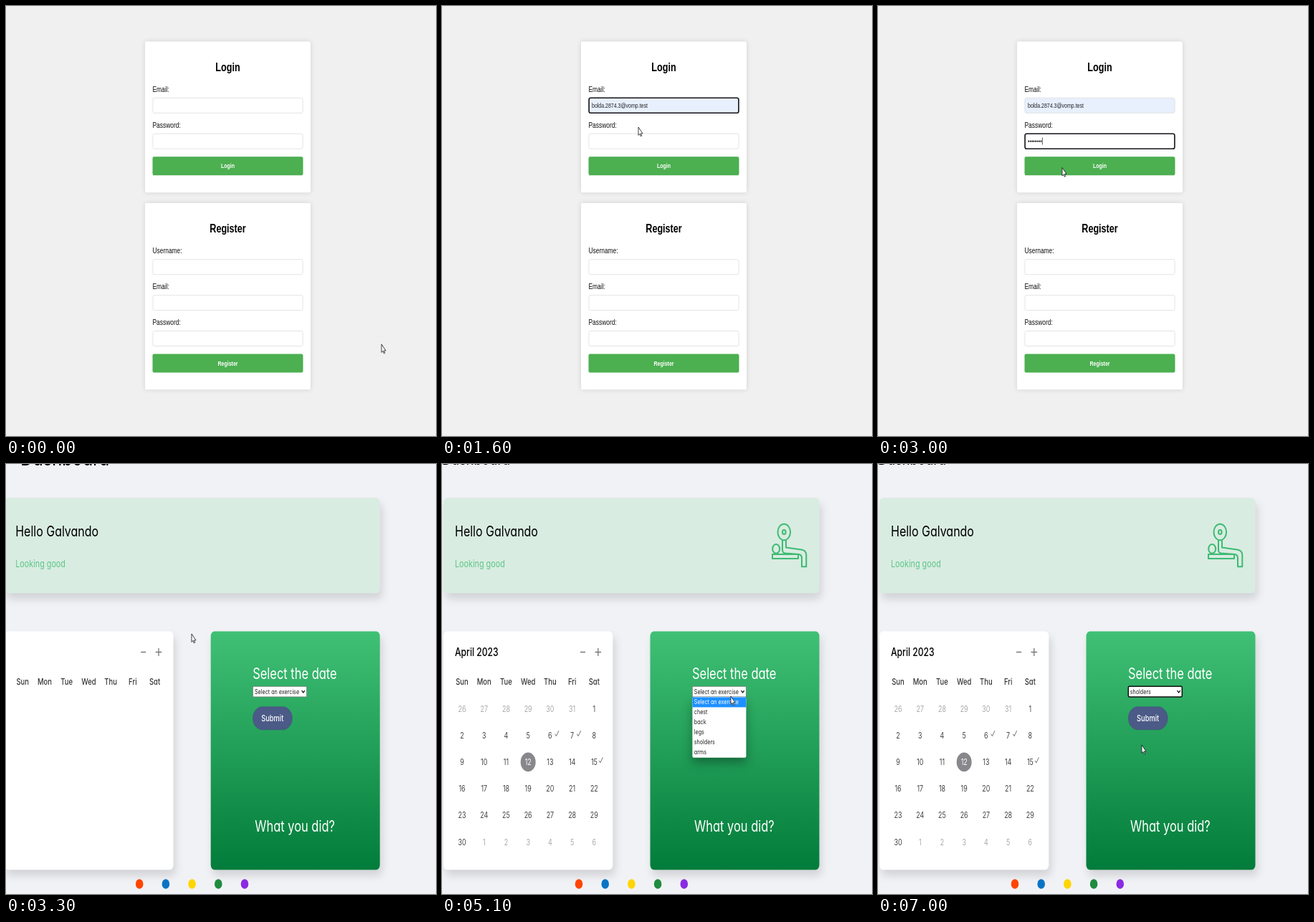
These frames come from a looping animation (600 by 600 pixels, 7.2 s). An HTML page:

```html
<!DOCTYPE html>
<html lang="en">
<head>
<meta charset="utf-8">
<title>Login and dashboard</title>
<style>
  html, body { margin: 0; width: 100%; height: 100%; overflow: hidden; background: #f0f0f0; }
  svg { display: block; width: 600px; height: 600px; }
  text { white-space: pre; }
  .form { font-family: "Liberation Sans", Arial, sans-serif; }
  .list { font-family: "Open Sans", "Noto Sans", sans-serif; }
  .dash { font-family: Inter, "Open Sans", sans-serif; font-feature-settings: "cv11"; }
  .card { filter: drop-shadow(0 0 3px rgba(0, 0, 0, .13)); }
  .tile { filter: drop-shadow(3px 8px 6px rgba(0, 0, 0, .13)); }
  .popup { filter: drop-shadow(0 2px 2px rgba(0, 0, 0, .25)); }
  .menu { filter: drop-shadow(0 7px 7px rgba(0, 0, 0, .32)); }
</style>
</head>
<body>
<svg id="stage" viewBox="0 0 600 600">
  <defs>
    <linearGradient id="green" x2="0" y2="1">
      <stop stop-color="#40c075"/>
      <stop offset="1" stop-color="#027c3a"/>
    </linearGradient>
  </defs>
</svg>
<script>
const LOOP = 7200, STEP = 100;
const SQUEEZE = 0.7875; // the whole screen is shown narrower than recorded
const stage = document.getElementById('stage');

function add(parent, tag, attrs = {}) {
  const node = document.createElementNS('http://www.w3.org/2000/svg', tag);
  for (const k in attrs) node.setAttribute(k, attrs[k]);
  return parent.appendChild(node);
}
const group = (parent, cls = '') => add(parent, 'g', { class: cls });
const box = (parent, x, y, width, height, fill, more) =>
  add(parent, 'rect', { x, y, width, height, fill, ...more });
const line = (parent, d, stroke, width, more) =>
  add(parent, 'path', { d, stroke, fill: 'none', 'stroke-width': width, ...more });
const oval = (parent, cx, cy, rx, ry, fill, more) =>
  add(parent, 'ellipse', { cx, cy, rx, ry, fill, ...more });
function label(parent, x, y, str, size, more) {
  const node = add(parent, 'text', {
    transform: `translate(${x} ${y}) scale(${SQUEEZE} 1)`, 'font-size': size, ...more
  });
  node.textContent = str;
  return node;
}
const show = (node, on) => node.setAttribute('visibility', on ? 'inherit' : 'hidden');
const MID = { 'text-anchor': 'middle' };

// Login page
const forms = group(stage, 'form');
box(forms, 0, 0, 600, 600, '#f0f0f0');

function field(name, y) {
  label(forms, 204.5, y - 8, name, 10.67, { fill: '#111' });
  return box(forms, 204.9, y + .4, 209.2, 21, '#fff', { rx: 2.1, ry: 2.7, stroke: '#ddd', 'stroke-width': .8 });
}
function form(title, y, height, names) {
  box(forms, 194, y, 231, height, '#fff', { rx: 2.1, ry: 2.7, class: 'card' });
  label(forms, 309.5, y + 41.3, title, 16, { ...MID, 'font-weight': 700 });
  const fields = names.map((name, i) => field(name, y + 78.3 + i * 49.9));
  const top = y + 60.8 + names.length * 49.9;
  box(forms, 204.5, top, 210, 26, '#4caf50', { rx: 2.1, ry: 2.7 });
  label(forms, 309.5, top + 16.2, title, 8.9, { ...MID, fill: '#fff', 'font-weight': 700 });
  return fields;
}
const [emailBox] = form('Login', 49.6, 210.6, ['Email:', 'Password:']);
form('Register', 275, 260.3, ['Username:', 'Email:', 'Password:']);

const emailText = label(forms, 209, 142, '', 8.9, { fill: '#222' });
const passText = label(forms, 209, 192, '', 8.9, { fill: '#222' });
const ring = box(forms, 205.1, 0, 208.8, 21, 'none', { rx: 2.2, ry: 2.8, stroke: '#15151c', 'stroke-width': 1.6 });
const caret = box(forms, 0, 0, .7, 10, '#111');

const MAILS = [
  'bolda.2874.3@vomp.test', 'magic_tuvo@quimzo.test', 'lavoki.5518@vomp.test',
  'bolda_2874_3@quimzo.test', 'Bolda.2874.3@vomp.test', 'noxcalidiro47@vomp.test'
];
const popup = group(forms, 'list');
box(popup, 256.5, 156, 107, 149, '#fff', { rx: 1.5, class: 'popup' });
const mailMark = box(popup, 256.5, 159, 107, 24, '#ececec');
MAILS.forEach((mail, i) => label(popup, 263, 173.6 + i * 24, mail, 8, { fill: '#333' }));

// Dashboard
const dash = group(stage, 'dash');
box(dash, 0, 0, 600, 600, '#f1f2f6');
const page = group(dash);
const heading = label(page, 0, 0, 'Dashboard', 23);

const tile = (x, y, w, h, fill) => box(page, x, y, w, h, fill, { rx: 5.2, ry: 6.7, class: 'tile' });
tile(2, 47.3, 524.5, 133, '#d9ece1');
tile(2, 233.6, 236.3, 332.6, '#fff');
tile(290.5, 233.6, 236, 332.6, 'url(#green)');

label(page, 18, 101, 'Hello Galvando', 20.3);
label(page, 18, 144, 'Looking good', 13.7, { fill: '#5bc688' });
line(page, 'M193 262.5h7M213.5 262.5h8.6M217.8 257v11', '#777', 1.3);

const colX = c => 28 + c * 30.72;
['Sun', 'Mon', 'Tue', 'Wed', 'Thu', 'Fri', 'Sat'].forEach((day, c) =>
  label(page, colX(c), 308.4, day, 12, { ...MID, fill: '#333', 'font-weight': 500 }));

const loaded = group(page);
label(loaded, 18, 268.3, 'April 2023', 15.4, { 'font-weight': 500 });
for (let i = 0; i < 42; i++) {
  const x = colX(i % 7), y = 341.5 + Math.floor(i / 7) * 37.2;
  const inMonth = i >= 6 && i < 36;
  const day = i < 6 ? 26 + i : i < 36 ? i - 5 : i - 35;
  const today = inMonth && day === 12;
  if (today) oval(loaded, x, y, 10.5, 13.3, '#88888c');
  label(loaded, x, y + 4.1, day, 11.3, { ...MID, fill: today ? '#fff' : inMonth ? '#444' : '#aaa' });
  if (inMonth && [6, 7, 15].includes(day))
    line(loaded, `M${x + 6.8} ${y - 2}l1.7 3 3.6-7.6`, '#666', .9);
}

// Bench press icon
const icon = add(loaded, 'g', {
  fill: 'none', stroke: '#3dbb73', 'stroke-width': 2, 'stroke-linejoin': 'round'
});
oval(icon, 477.3, 95, 8.8, 11.3, 'none');
oval(icon, 477.3, 95, 2.3, 3, 'none');
oval(icon, 466.2, 118.4, 5, 6.4, 'none');
add(icon, 'path', { d: 'M461 126h36v6h-36z' });
add(icon, 'path', { d: 'M475 106.5V120q0 4 4 4.5l19 1.5q4 1 4 5v12.3h6.3V127q0-6.5-7-7.5l-21.3-3v-10' });

label(page, 349, 300, 'Select the date', 20.9, { fill: '#fff' });
label(page, 352, 513, 'What you did?', 20.9, { fill: '#fff' });
box(page, 349.3, 338.8, 54.8, 32, '#4b5a86', {
  rx: 13, ry: 16, stroke: '#3f4c78', 'stroke-width': .8, 'stroke-dasharray': '1.5 1'
});
label(page, 376.6, 359, 'Submit', 11.8, { ...MID, fill: '#fff', 'font-weight': 500 });

const select = box(page, 349.3, 310.3, 75, 14.6, '#fff', { stroke: '#767676', 'stroke-width': .7 });
const choice = label(page, 351.8, 321, '', 9.1, { fill: '#222' });
line(page, 'M417.5 316.2l2.1 2.7 2.1-2.7', '#111', 1.3);

const OPTIONS = ['Select an exercise', 'chest', 'back', 'legs', 'sholders', 'arms'];
const menu = group(page);
box(menu, 349.4, 325, 75, 84.7, '#fff', { rx: 2, class: 'menu' });
const optionMark = box(menu, 349.4, 0, 75, 14, '#1e90ff');
const options = OPTIONS.map((name, i) => label(menu, 351.8, 335.4 + i * 14, name, 9.1));

['#ff4500', '#0a74c4', '#ffd500', '#1f8b3f', '#8a2be2'].forEach((color, i) =>
  oval(page, 191 + i * 36.7, 586, 5.3, 6.8, color));

// Pointer
const pointer = group(stage);
const arrow = add(pointer, 'path', {
  d: 'M0 0V11.4L1.9 9.4 3.3 12.8 4.7 12.2 3.4 8.9H6Z', fill: '#fff', stroke: '#111', 'stroke-width': .8
});
const beam = line(pointer, 'M-2-5h4M0-5v10M-2 5h4', '#222', .9);

const PATH = [ // ms, x, y
  [0, 524, 472], [700, 257, 147], [1100, 257, 147], [1400, 274, 169], [1600, 274, 169],
  [1900, 255, 190], [2100, 255, 206], [2500, 255, 206], [2900, 257, 225], [3100, 257, 226],
  [3300, 259, 237], [3600, 259, 240], [4100, 203, 331], [4400, 212, 350], [4900, 403, 318],
  [5100, 403, 324], [5400, 401, 340], [5800, 390, 386], [6200, 388, 388], [6700, 368, 392], [7200, 368, 392]
];
function pointerAt(t) {
  const i = PATH.findIndex(p => p[0] > t);
  const [t0, x0, y0] = PATH[i - 1], [t1, x1, y1] = PATH[i];
  const u = (t - t0) / (t1 - t0), e = u * u * (3 - 2 * u);
  return [x0 + (x1 - x0) * e, y0 + (y1 - y0) * e];
}

function drawForms(t) {
  const filled = t >= 1500, onPass = t >= 1900;
  const typed = filled ? MAILS[0] : t >= 1000 ? 'b' : '';
  const dots = Math.max(0, Math.min(8, (t - 2100) / STEP));
  emailText.textContent = typed;
  passText.textContent = '•'.repeat(dots);
  emailBox.setAttribute('fill', filled ? '#e8f0fe' : '#fff');
  show(ring, t >= 800 && t < 3100);
  ring.setAttribute('y', onPass ? 178.2 : 128.3);
  show(caret, t >= 800 && t < 3100 && (onPass || !filled));
  caret.setAttribute('x', 209.3 + (onPass ? dots * 2.45 : typed.length * 3.9));
  caret.setAttribute('y', onPass ? 183.5 : 133.7);
  show(popup, t >= 900 && t < 1500);
  show(mailMark, t >= 1300 && t < 1500);
}

function drawDash(t, y) {
  const ready = t >= 3400, picked = t >= 6000, open = t >= 5000 && !picked;
  page.setAttribute('transform', `translate(${ready ? 0 : -4.8} 0)`);
  heading.setAttribute('transform', `translate(${ready ? 0 : 25} ${ready ? .8 : 2.2}) scale(${SQUEEZE} 1)`);
  heading.setAttribute('font-size', ready ? 23 : 30);
  show(loaded, ready);
  show(menu, open);
  const row = Math.max(0, Math.min(5, Math.floor((y - 325.4) / 14)));
  optionMark.setAttribute('y', 325.4 + row * 14);
  options.forEach((o, i) => o.setAttribute('fill', i === row ? '#fff' : '#222'));
  choice.textContent = OPTIONS[picked ? 4 : 0];
  select.setAttribute('stroke', picked ? '#101010' : '#767676');
  select.setAttribute('stroke-width', picked ? 1.5 : .7);
  select.setAttribute('rx', picked ? 1.5 : 0);
}

function draw(now) {
  const t = Math.floor((now % LOOP) / STEP) * STEP;
  const [x, y] = pointerAt(t);
  const inside = t >= 3300;
  show(forms, !inside);
  show(dash, inside);
  if (inside) {
    drawDash(t, y);
  } else {
    drawForms(t);
  }
  const text = (t >= 700 && t < 1200) || (t >= 1800 && t < 2700);
  pointer.setAttribute('transform', `translate(${x} ${y})`);
  show(arrow, !text);
  show(beam, text);
}

let start;
function tick(now) {
  start ??= now;
  draw(now - start);
  requestAnimationFrame(tick);
}
draw(0);
requestAnimationFrame(tick);
</script>
</body>
</html>
```
